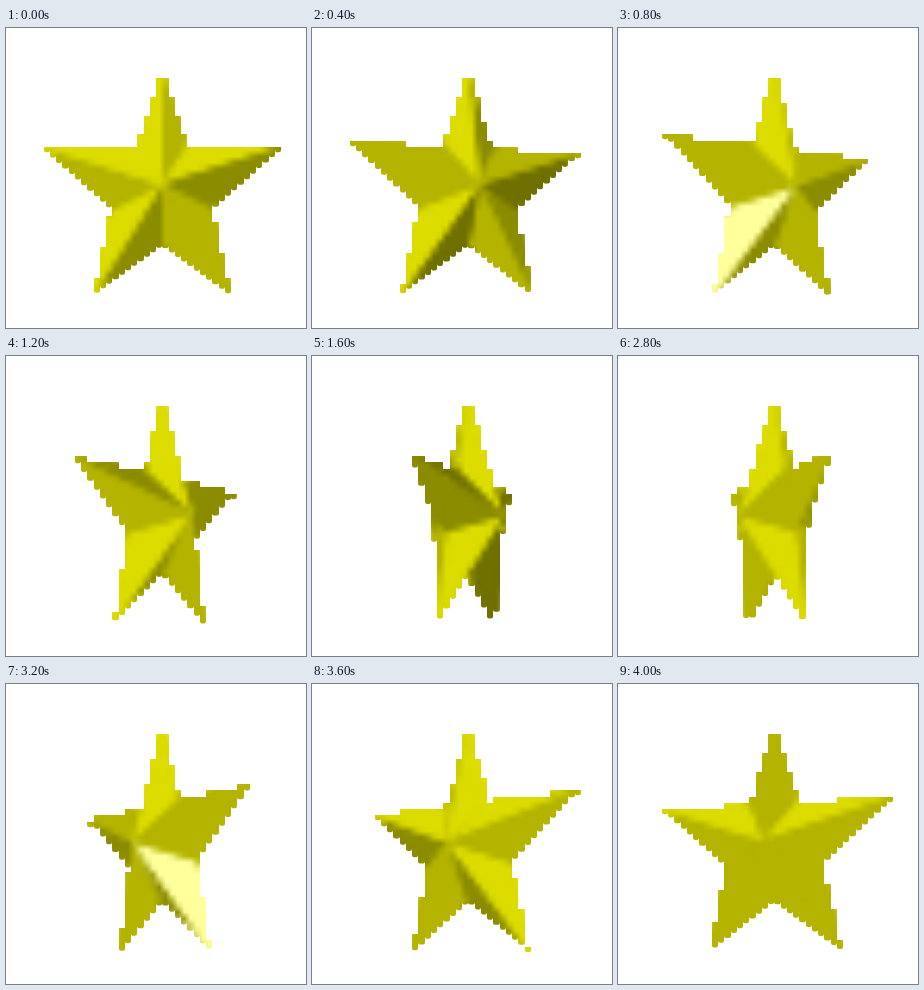
An HTML page with a canvas that plays this animation: 300 px wide and 300 px high, repeating every 4400 ms.

```html
<!DOCTYPE html>
<html lang="en">
<head>
<meta charset="utf-8">
<title>Turning star</title>
<style>
html, body { margin: 0; width: 100%; height: 100%; overflow: hidden; background: #fff; }
canvas { display: block; width: 300px; height: 300px; }
</style>
</head>
<body>
<canvas id="stage" width="300" height="300"></canvas>
<script>
const STEP = 400, STEPS = 11;         // half a turn per loop
const GRID = 48, CELL = 300 / GRID, CENTER = 156;
const DEPTH = 38, TILT = 0.15, CAMERA = 900;
const ctx = document.getElementById('stage').getContext('2d');
const low = document.createElement('canvas');
low.width = low.height = GRID;
const paint = low.getContext('2d');
paint.scale(1 / CELL, 1 / CELL);

// Right half of the star from top to notch, then its mirror image.
const half = [[25, -37], [120, -37], [50, 25], [68, 110]];
const rim = [
  [0, -114], ...half, [0, 61],
  ...half.map(([x, y]) => [-x, y]).reverse()
];

const LIGHT = [-0.25, -0.26, 0.96], GLINT = [-0.15, 0, 0.989];
const dot = (a, b) => a[0] * b[0] + a[1] * b[1] + a[2] * b[2];

function spin([x, y, z], angle) {
  const c = Math.cos(angle), s = Math.sin(angle);
  return [x * c + z * s, y, z * c - x * s];
}

function project(point, angle) {
  const [x, y, z] = spin(point, angle);
  const k = CAMERA / (CAMERA - z);
  return [CENTER + x * k, CENTER + y * k - TILT * z];
}

function tone(n) {
  if (dot(n, GLINT) > 0.985) return '#ffff9c';
  const lit = Math.max(dot(n, LIGHT), 0.6 * Math.abs(n[0]));
  if (lit > 0.79) return '#dcdc00';
  if (lit > 0.52) return '#b4b400';
  return lit > 0.4 ? '#8c8c00' : '#707000';
}

// Two five-pointed pyramids back to back; keeps the faces turned to the viewer.
function visibleFacets(angle) {
  const facets = [];
  for (const side of [1, -1]) {
    const hub = [0, TILT * DEPTH, side * DEPTH];
    rim.forEach(([px, py], i) => {
      const [qx, qy] = rim[(i + 1) % rim.length];
      const pts = [[px, py, 0], [qx, qy, 0], hub].map(v => project(v, angle));
      const [a, b, c] = pts;
      const area = (b[0] - a[0]) * (c[1] - a[1]) - (b[1] - a[1]) * (c[0] - a[0]);
      if (area * side <= 0) return;
      const len = Math.hypot(qx - px, qy - py) * Math.SQRT2;
      const normal = [(qy - py) / len, (px - qx) / len, side * Math.SQRT1_2];
      const z = spin([px + qx, 0, hub[2]], angle)[2];
      facets.push({ pts, z, color: tone(spin(normal, angle)) });
    });
  }
  return facets.sort((f, g) => f.z - g.z);
}

function crossings(pts, x) {
  const ys = [];
  pts.forEach(([x1, y1], i) => {
    const [x2, y2] = pts[(i + 1) % pts.length];
    if ((x1 <= x) !== (x2 <= x)) ys.push(y1 + (y2 - y1) * (x - x1) / (x2 - x1));
  });
  return ys.sort((a, b) => a - b);
}

// Stair-stepped silhouette made of whole grid columns.
function silhouette(facets) {
  const path = new Path2D();
  for (let col = 0; col < GRID; col++) {
    const spans = [];
    for (const s of [0.35, 0.5, 0.65]) {
      for (const f of facets) {
        const ys = crossings(f.pts, (col + s) * CELL);
        if (ys.length) spans.push(ys);
      }
    }
    const runs = [];
    for (const [top, bottom] of spans.sort((a, b) => a[0] - b[0])) {
      const last = runs[runs.length - 1];
      if (last && top < last[1] + 2) last[1] = Math.max(last[1], bottom);
      else runs.push([top, bottom]);
    }
    const x = Math.round(col * CELL), w = Math.round((col + 1) * CELL) - x;
    for (const [top, bottom] of runs) {
      const y = Math.round(Math.round(top / CELL) * CELL);
      path.roundRect(x, y, w, Math.max(bottom - y, CELL - 1), [0, 0, 2, 2]);
    }
  }
  return path;
}

function poly(pts) {
  const path = new Path2D();
  pts.forEach(([x, y]) => path.lineTo(x, y));
  path.closePath();
  return path;
}

function draw(angle) {
  const facets = visibleFacets(angle);

  // Wide strokes carry each tone past the edge before the fills settle it.
  paint.clearRect(0, 0, 300, 300);
  paint.lineWidth = 16;
  paint.lineJoin = 'round';
  for (const f of facets) {
    paint.strokeStyle = f.color;
    paint.stroke(poly(f.pts));
  }
  for (const f of facets) {
    paint.fillStyle = f.color;
    paint.fill(poly(f.pts));
  }

  ctx.fillStyle = '#fff';
  ctx.fillRect(0, 0, 300, 300);
  ctx.save();
  ctx.clip(silhouette(facets));
  ctx.drawImage(low, 0, 0, 300, 300);
  ctx.restore();
}

let shown = -1;
function tick() {
  const n = Math.floor(performance.now() / STEP) % STEPS;
  if (n !== shown) {
    shown = n;
    draw(n * Math.PI / STEPS);
  }
  requestAnimationFrame(tick);
}
tick();
</script>
</body>
</html>
```
